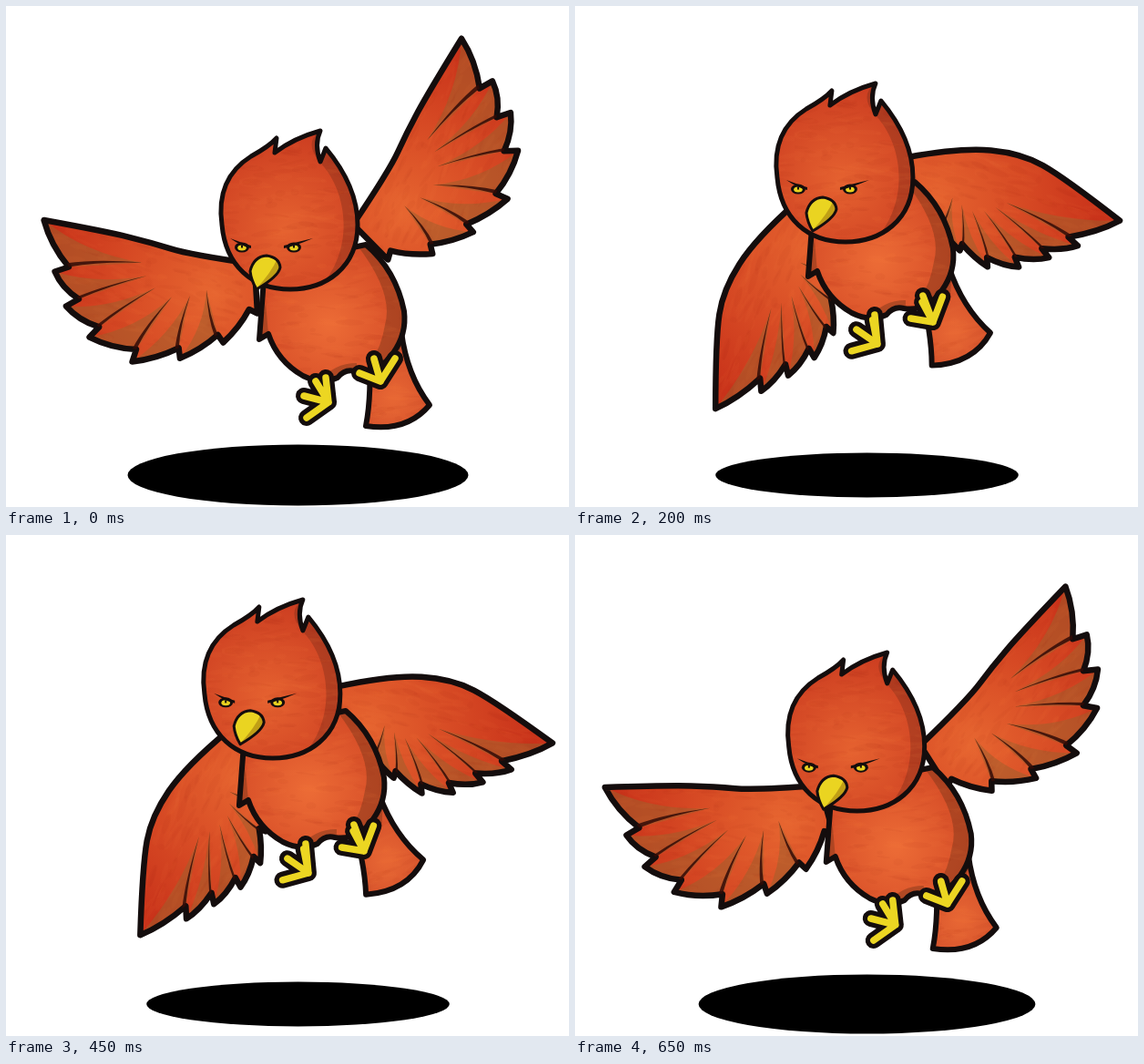
These frames come from a looping animation (618x550 px, 700 ms). An HTML page with a canvas:

```html
<!DOCTYPE html>
<html lang="en">
<head>
<meta charset="utf-8">
<title>Flapping red bird</title>
<style>
  html, body { margin: 0; width: 100%; height: 100%; overflow: hidden; background: #fff; }
  canvas { display: block; }
</style>
</head>
<body>
<canvas id="stage" width="618" height="550"></canvas>
<script>
const ctx = document.getElementById('stage').getContext('2d');
const STEP = 50, STEPS = 14;
const INK = '#140d0d';

// One value per 50 ms step
const bodyY = [0, -26, -45, -59, -69, -79, -85, -85, -79, -69, -55, -38, -21, -7];
const headY = [0, -22, -38, -45, -52, -60, -67, -70, -70, -66, -57, -45, -27, -8];
const wingAngle = [-61.7, -30, 7.8, 16, 15.7, -12, -38.6, -40, -12, 13.9, 16, 8.7, -20, -49.5];
const tailAngle = [0, -1, -3, -7, -11, -16, -21, -21, -18, -13, -9, -5, -2, 0];
const footAngle = [0, 0, 3, 10, 20, 30, 35, 35, 30, 20, 12, 3, 0, 0];

// Wing outline along the leading edge, then the feather tips, raised and lowered
const edgeUp = [[-4, -8], [67, -1], [112, -4], [163, -4]];
const edgeDown = [[-4, -4], [49, -30], [115, -42], [168, -29]];
const tipsUp = [[232, 0], [207, 52], [186, 86], [153, 113], [101, 128], [51, 112], [9, 84], [-20, 44]];
const tipsDown = [[239, 0], [202, 39], [175, 60], [146, 79], [113, 88], [79, 79], [48, 66], [4, 28]];

const head = new Path2D(`M237 240C232 204 245 180 269 165Q289 154 297 145L295 161Q316 145 345 137
  Q338 152 345 171L351 156Q386 198 386 240C386 288 350 311 312 311C270 311 241 285 237 240Z`);
const headShade = new Path2D('M345 137Q326 150 345 172C376 205 384 270 340 314L400 310V180L351 150Z');
const body = new Path2D(`M283 300Q280 340 278 366L288 360Q298 390 326 406Q346 416 364 408Q372 398 383 401
  Q408 405 425 381Q440 360 437 335Q428 290 395 262L310 280Z`);
const bodyShade = new Path2D(`M385 262Q426 315 416 350Q412 374 402 388L425 400L450 340V260Z
  M340 420Q355 392 385 392V420Z M278 366L288 360L285 325Z`);
const tail = new Path2D('M398 372Q402 425 395 461Q440 468 465 438Q440 405 434 358Z');
const tailShade = new Path2D('M390 365H436L430 388Q422 408 399 418Z');
const beak = new Path2D('M268 291Q272 275 286 274Q300 276 301 287Q299 297 275 311Q269 301 268 291Z');
const beakShade = new Path2D('M298 277Q291 293 274 311L305 297Z');

// Hub, leg root and toes; the toes are relative to the hub
const leftFoot = { hub: [354, 435], leg: [351, 408], toes: [[-14, -23], [-27, -7], [-24, 17]], drift: [0, .25], turn: 1 };
const rightFoot = { hub: [411, 412], leg: [404, 387], toes: [[-23, -9], [-7, -24], [16, -25]], drift: [.2, .2], turn: -.6 };

const lerp = (a, b, k) => a.map((v, i) => v + (b[i] - v) * k);
const blend = (a, b, k) => a.map((p, i) => lerp(p, b[i], k));

function gradient(x, y, r, inner, outer) {
  const g = ctx.createRadialGradient(x, y, 5, x, y, r);
  g.addColorStop(0, inner);
  g.addColorStop(1, outer);
  return g;
}
const headFill = gradient(308, 245, 112, '#e4602f', '#cb3c20');
const bodyFill = gradient(355, 350, 95, '#eb6a35', '#d44a26');
const tailFill = gradient(425, 430, 65, '#e66533', '#cf4a28');
const wingFill = gradient(35, 35, 210, '#e5632f', '#c52c17');
const paper = makePaper();

// Faint watercolour streaks
function makePaper() {
  const tile = document.createElement('canvas');
  tile.width = tile.height = 256;
  const c = tile.getContext('2d');
  let seed = 7;
  const rnd = () => (seed = seed * 16807 % 2147483647) / 2147483647;
  for (let i = 0; i < 500; i++) {
    c.fillStyle = rnd() < .5 ? 'rgba(130,20,5,.045)' : 'rgba(255,140,70,.045)';
    c.beginPath();
    c.ellipse(rnd() * 256, rnd() * 256, 3 + rnd() * 14, 1 + rnd() * 3, rnd() * .5 - .25, 0, 7);
    c.fill();
  }
  return ctx.createPattern(tile, 'repeat');
}

function part(path, fill, shade, shadeColor = 'rgba(125,55,25,.48)', width = 6) {
  ctx.fillStyle = fill;
  ctx.fill(path);
  ctx.save();
  ctx.clip(path);
  ctx.fillStyle = shadeColor;
  ctx.fill(shade);
  ctx.restore();
  if (width > 4) {
    ctx.fillStyle = paper;
    ctx.fill(path);
  }
  ctx.strokeStyle = INK;
  ctx.lineWidth = width;
  ctx.stroke(path);
}

function at(x, y, draw, degrees = 0, px = 0, py = 0) {
  ctx.save();
  ctx.translate(x + px, y + py);
  ctx.rotate(degrees * Math.PI / 180);
  ctx.translate(-px, -py);
  draw();
  ctx.restore();
}

function wing(low) {
  const edge = blend(edgeUp, edgeDown, low);
  const tips = blend(tipsUp, tipsDown, low);
  const core = [60, 0];
  const outline = new Path2D(), shades = new Path2D(), creases = new Path2D();

  outline.moveTo(...edge[0]);
  for (let i = 1; i < 3; i++) outline.quadraticCurveTo(...edge[i], ...lerp(edge[i], edge[i + 1], .5));
  outline.quadraticCurveTo(...edge[3], ...tips[0]);
  for (let i = 0; i < tips.length - 1; i++) {
    const tip = tips[i], next = tips[i + 1];
    const notch = lerp(lerp(next, core, .11), tip, .06);
    const inner = lerp(next, core, .62);
    const mid = lerp(tip, notch, .55);
    const bulge = lerp(mid, core, -.05);
    outline.quadraticCurveTo(...bulge, ...notch);
    outline.lineTo(...next);
    if (i > 5) continue;
    shades.moveTo(...tip);
    shades.quadraticCurveTo(...bulge, ...notch);
    shades.lineTo(...inner);
    shades.quadraticCurveTo(...lerp(lerp(notch, tip, .3), core, .18), ...tip);
    const bend = lerp(lerp(notch, inner, .5), tip, .08);
    creases.moveTo(...notch);
    creases.quadraticCurveTo(...bend, ...inner);
    creases.quadraticCurveTo(...lerp(bend, tip, .06), ...lerp(notch, tip, .08));
  }
  outline.closePath();

  part(outline, wingFill, shades, 'rgba(160,95,45,.55)', 6.5);
  ctx.fillStyle = 'rgba(50,12,8,.85)';
  ctx.fill(creases);
}

function foot({ hub, leg, toes, drift, turn }, angle) {
  const [x, y] = hub.map((v, i) => v + drift[i] * angle);
  const a = angle * turn * Math.PI / 180;
  const path = new Path2D();
  path.moveTo(...leg);
  path.lineTo(x, y);
  for (const [u, v] of toes) {
    path.moveTo(x, y);
    path.lineTo(x + u * Math.cos(a) - v * Math.sin(a), y + u * Math.sin(a) + v * Math.cos(a));
  }
  ctx.strokeStyle = INK;
  ctx.lineWidth = 18;
  ctx.stroke(path);
  ctx.strokeStyle = '#ecd622';
  ctx.lineWidth = 7.5;
  ctx.stroke(path);
}

function eye(x, y, innerX, outerX) {
  ctx.fillStyle = INK;
  ctx.beginPath();
  ctx.ellipse(x, y, 8, 5.5, 0, 0, 7);
  ctx.fill();
  ctx.fillStyle = '#e8d21f';
  ctx.beginPath();
  ctx.ellipse(x, y + .5, 4.8, 3, 0, 0, 7);
  ctx.fill();
  ctx.fillStyle = INK;
  ctx.fillRect(x - 1, y - 2.5, 2, 3);
  // Frowning lid, tapered towards the outer end
  ctx.beginPath();
  ctx.moveTo(outerX, y - 10);
  ctx.quadraticCurveTo(x, y - 5, innerX, y - 2);
  ctx.lineTo(innerX, y + 1);
  ctx.quadraticCurveTo(x, y - 1, outerX, y - 10);
  ctx.fill();
}

function face() {
  eye(259, 265, 269, 246);
  eye(316, 265, 305, 337);
  part(beak, '#ead421', beakShade, 'rgba(165,125,15,.6)', 3);
}

function draw(step) {
  ctx.clearRect(0, 0, 618, 550);
  ctx.lineJoin = ctx.lineCap = 'round';
  const by = bodyY[step], hy = headY[step], angle = wingAngle[step];
  const low = Math.min(1, Math.max(0, (angle + 38) / 46));

  ctx.fillStyle = '#000';
  ctx.beginPath();
  ctx.ellipse(320.5, 515, 187 + by * .3, 33.5 + by * .131, 0, 0, 7);
  ctx.fill();

  at(by * .32, by, () => {
    at(390, 240, () => wing(low), angle);
    ctx.save();
    ctx.translate(267, 290);
    ctx.scale(-1, 1);
    at(0, 0, () => wing(low), angle + 48 + 4 * low);
    ctx.restore();
    at(0, 0, () => part(tail, tailFill, tailShade), tailAngle[step], 418, 365);
    part(body, bodyFill, bodyShade);
    foot(leftFoot, footAngle[step]);
    foot(rightFoot, footAngle[step]);
  });
  at(hy * .29, hy, () => part(head, headFill, headShade, 'rgba(125,45,25,.4)', 5));
  at(hy * .27, hy * 1.23, face);
}

function tick() {
  draw(Math.floor(performance.now() / STEP) % STEPS);
  requestAnimationFrame(tick);
}
tick();
</script>
</body>
</html>
```
